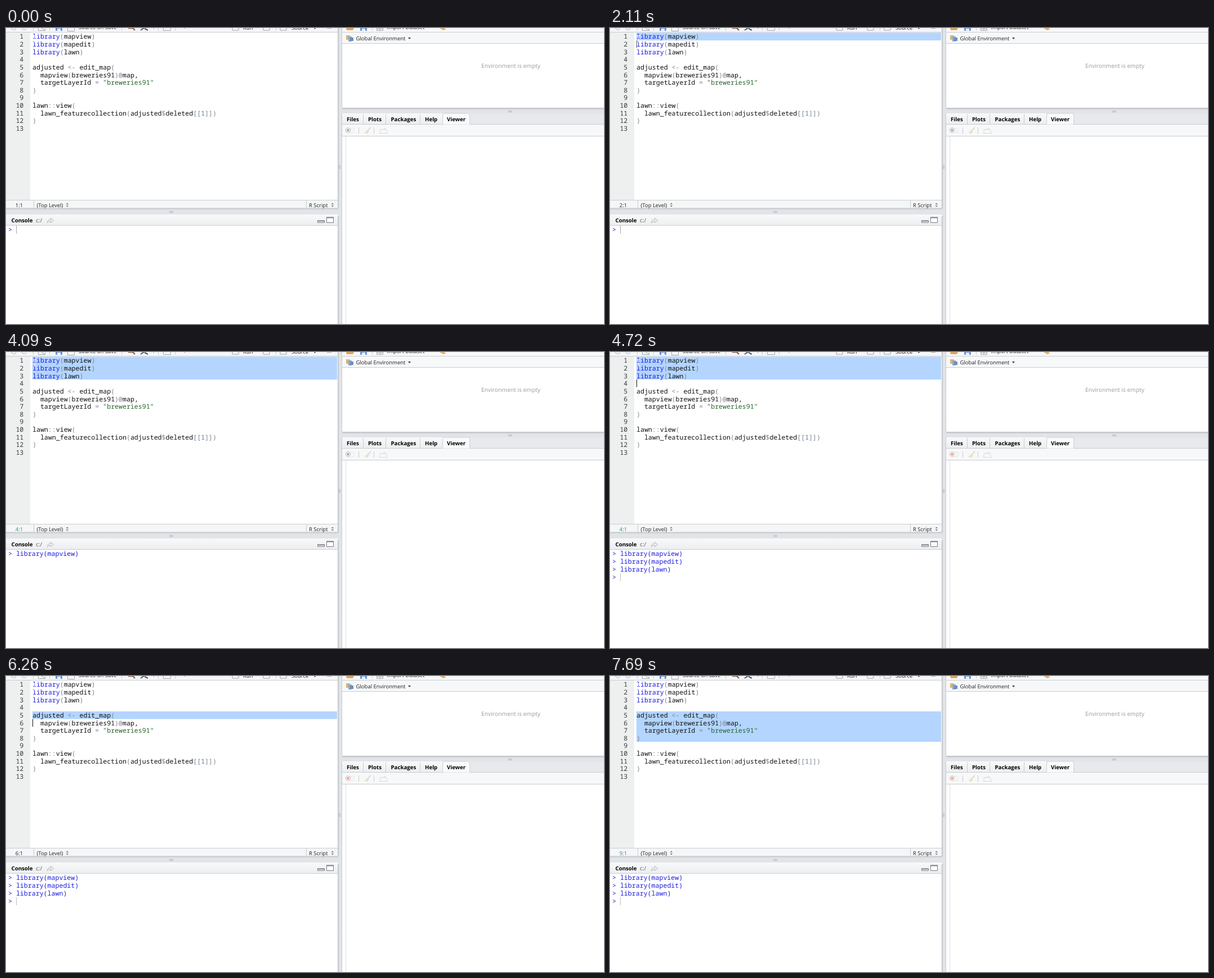
Animation of 1062 by 527 pixels, one loop 8000 ms. Source, as an HTML page:

```html
<!DOCTYPE html>
<html lang="en">
<head>
<meta charset="utf-8">
<title>Editor session</title>
<style>
html, body { margin: 0; width: 100%; height: 100%; overflow: hidden; background: #fff; }
svg { display: block; width: 1062px; height: 527px; }
text { font: 9.5px "Open Sans", "Noto Sans", sans-serif; fill: #222; text-rendering: geometricPrecision; }
.bold text { font-weight: 700; font-size: 9.7px; fill: #000; }
.mono text { font: 11.6px "Noto Sans Mono", monospace; fill: #111; }
.mono .nums { fill: #3a3a3a; text-anchor: end; }
.mono .con { fill: #1c1ce0; }
.k { fill: #1a1ae0; }
.o { fill: #7b8590; }
.s { fill: #23652a; }
.n { fill: #5674b8; }
.line { fill: none; stroke: #c9ccd0; }
.thin { fill: none; stroke: #a5a8ab; }

.sel, .cursor, .pos, .out1, .out2, .out3, .caret, .stop {
  animation: 8s step-end infinite;
}
.sel { animation-name: sel; }
.cursor { animation-name: cursor; }
.pos { animation-name: pos; }
.out1 { animation-name: out1; }
.out2 { animation-name: out2; }
.out3 { animation-name: out3; }
.caret { animation-name: caret; }
.stop { animation-name: stop; }

@keyframes sel {
  0% { y: 8.5px; height: 0; }
  24.875% { y: 8.5px; height: 13.6px; }
  30.875% { y: 8.5px; height: 27.3px; }
  35.625% { y: 8.5px; height: 40.5px; }
  67.75% { y: 63px; height: 0; }
  78.25% { y: 63px; height: 13.6px; }
  82.5% { y: 63px; height: 27.3px; }
  84% { y: 63px; height: 40.9px; }
  89.875%, 100% { y: 63px; height: 54.2px; }
}
@keyframes cursor {
  0% { y: 8.5px; opacity: 0; }
  .875% { y: 8.5px; opacity: 1; }
  8.5% { y: 8.5px; opacity: 0; }
  13.125% { y: 8.5px; opacity: 1; }
  20% { y: 8.5px; opacity: 0; }
  24.875% { y: 22.1px; opacity: 0; }
  26.375% { y: 22.1px; opacity: .7; }
  30.875% { y: 35.8px; opacity: 1; }
  35.625% { y: 49px; opacity: 1; }
  40.25% { y: 49px; opacity: 0; }
  44.875% { y: 49px; opacity: 1; }
  51.125% { y: 49px; opacity: 0; }
  59% { y: 49px; opacity: 1; }
  67.75% { y: 63px; opacity: 1; }
  73.75% { y: 63px; opacity: 0; }
  78.25% { y: 76.7px; opacity: 1; }
  82.5% { y: 90.3px; opacity: 1; }
  84% { y: 103.9px; opacity: 1; }
  89.875% { y: 117.5px; opacity: 1; }
  96.125%, 100% { y: 117.5px; opacity: 0; }
}
@keyframes pos {
  0% { transform: none; }
  24.875% { transform: translateY(-20px); }
  30.875% { transform: translateY(-40px); }
  35.625% { transform: translateY(-60px); }
  67.75% { transform: translateY(-80px); }
  78.25% { transform: translateY(-100px); }
  82.5% { transform: translateY(-120px); }
  84% { transform: translateY(-140px); }
  89.875%, 100% { transform: translateY(-160px); }
}
@keyframes out1 { 0% { opacity: 0; } 51.125%, 100% { opacity: 1; } }
@keyframes out2 { 0% { opacity: 0; } 52.625%, 100% { opacity: 1; } }
@keyframes out3 { 0% { opacity: 0; } 56.25%, 100% { opacity: 1; } }
@keyframes caret {
  0% { y: 352px; opacity: 1; }
  51.125% { y: 352px; opacity: 0; }
  56.25%, 100% { y: 394px; opacity: .75; }
}
@keyframes stop { 0% { stroke: #989898; } 56.25%, 100% { stroke: #d58f8f; } }
</style>
</head>
<body>
<svg viewBox="0 0 1062 527">
  <defs>
    <linearGradient id="bar" x2="0" y2="1">
      <stop stop-color="#f8f9fa"/><stop offset="1" stop-color="#eceef0"/>
    </linearGradient>
    <linearGradient id="under" x2="0" y2="1">
      <stop stop-color="#b9bdc2"/><stop offset="1" stop-color="#e2e4e8"/>
    </linearGradient>
    <linearGradient id="beside">
      <stop stop-color="#b9bdc2"/><stop offset="1" stop-color="#e2e4e8"/>
    </linearGradient>
    <clipPath id="posBox"><rect y="307" width="48" height="13"/></clipPath>
    <path id="spin" d="M0 -1l2.3 -2.6L4.6 -1zM0 1l2.3 2.6L4.6 1z" fill="#777"/>
    <path id="drop" d="M0 0h5l-2.5 3z" fill="#333"/>
    <g id="disk"><path d="M0-7h12V5H0z" fill="#6f93cf"/><path d="M3 1h6v4H3z" fill="#e6edf8"/></g>
    <g id="sheet"><path d="M0-6h11v10H0z" fill="#fafafa" stroke="#9a9da0"/><path d="M7-1h6" stroke="#6a94c8" stroke-width="2"/></g>
    <path id="grip" d="M0 0h7M0 2h7" stroke="#b4b8bd"/>
  </defs>

  <!-- panes -->
  <rect width="1062" height="527" fill="#e2e4e8"/>
  <rect y="320" width="590" height="4" fill="url(#under)"/>
  <rect x="597" y="142" width="465" height="4" fill="url(#under)"/>
  <rect x="589" width="3" height="321" fill="url(#beside)"/>
  <rect x="589" y="335" width="3" height="192" fill="url(#beside)"/>
  <rect width="589" height="320" fill="#fff"/>
  <rect width="589" height="7.5" fill="#f5f6f7"/>
  <rect y="8" width="43" height="299" fill="#eef0f0"/>
  <rect y="307" width="589" height="13.5" fill="#f4f6f7"/>
  <rect y="332" width="589" height="195" fill="#fff"/>
  <path d="M0 332h585q4 0 4 4v15H0z" fill="url(#bar)"/>
  <rect x="597" width="465" height="142" fill="#fff"/>
  <rect x="597" width="465" height="27" fill="#f7f8f9"/>
  <rect x="597" y="152" width="465" height="375" fill="#fff"/>
  <rect x="597" y="152" width="465" height="19" fill="#e7e9ec"/>
  <path d="M597 152h178v19H597z" fill="url(#bar)"/>
  <path d="M775.5 172v-17q0-3 3-3h42q3 0 3 3v17z" fill="#f9fafb" stroke="#cdd0d4"/>
  <rect x="597" y="172" width="465" height="20" fill="#f7f8f9"/>
  <path class="line" d="M0 7.5h589M0 306.5h589M0 351.5h589M49.5 307v13M533.5 307v13M597 7.5h465M597 27.5h465M597 171.5h178M824 171.5h238M597 192.5h465M634.5 153v18M674.5 153v18M735.5 153v18"/>
  <path d="M596.5 0v142M596.5 152v375" stroke="#c6cacf"/>
  <path d="M603.5 193v334" stroke="#dcdee1"/>
  <use href="#grip" x="290" y="326.5"/>
  <use href="#grip" x="892" y="147.5"/>
  <path d="M591.5 244v7M593.5 244v7" stroke="#b4b8bd"/>

  <!-- cut-off toolbars -->
  <path d="M9 0q5 6 9 1M28 0q4 6 8 1" fill="none" stroke="#c9cccf" stroke-width="1.5"/>
  <path class="thin" d="M57.5 0v4.5h12V1M63 0l6 4M109.5 0v5.5h12V0M279.5 0v4.5h13V0M570 .5h8"/>
  <path class="line" d="M48.5 0v5M77.5 0v5M205.5 0v5M270.5 0v5M300.5 0v5M479.5 0v5M650.5 0v5"/>
  <use href="#disk" x="88"/>
  <path d="M217 0h8l4 4" fill="none" stroke="#87604b" stroke-width="2.4"/>
  <path d="M239 4l6-4M246 1l6 3" stroke="#4d5868" stroke-width="2"/>
  <use href="#drop" x="260" y="-2"/>
  <use href="#drop" x="315" y="-2"/>
  <use href="#sheet" x="402"/>
  <use href="#sheet" x="457"/>
  <use href="#sheet" x="487"/>
  <use href="#drop" x="546" y="-1"/>
  <path d="M604 0h14l-2 4h-11z" fill="#d9a867"/>
  <use href="#disk" x="629"/>
  <path class="thin" d="M658.5 0v4.5h11V0M664 0v4M659 1.5h10"/>
  <path d="M770 0l6 4 5-1-2-3z" fill="#ddb477"/>
  <text x="129" y="2.2">Source on Save</text>
  <text x="421" y="2.6">Run</text>
  <text x="507" y="2.6">Source</text>
  <text x="676.5" y="2.2">Import Dataset</text>

  <!-- environment and viewer -->
  <path d="M604 13h7v8h-7z" fill="#dfb36d"/>
  <path d="M608 15h6v9h-6z" fill="#86a9d6"/>
  <path d="M611 17h6v6h-6z" fill="#6c8fbe"/>
  <text x="621.5" y="21.6">Global Environment</text>
  <use href="#drop" x="714" y="17"/>
  <text x="844" y="71" style="font-size:10.3px;fill:#9a9a9a">Environment is empty</text>
  <g class="bold">
    <text x="605" y="165.5">Files</text>
    <text x="643" y="165.5">Plots</text>
    <text x="683.5" y="165.5">Packages</text>
    <text x="744" y="165.5">Help</text>
    <text x="783" y="165.5">Viewer</text>
    <text x="9.5" y="346">Console</text>
  </g>
  <path class="line" d="M626.5 177v11M653.5 177v11"/>
  <path d="M609 178.5h9v8h-9z" fill="#f7f7f7" stroke="#e8e9ea"/>
  <g class="stop" fill="#f4f2f2">
    <circle cx="607.5" cy="182" r="4.2" stroke-opacity=".6"/>
    <path d="M605.8 180.3l3.4 3.4m0-3.4l-3.4 3.4" stroke-width="1.5"/>
  </g>
  <path d="M648 177l-5 5" stroke="#d6cbc3" stroke-width="1.5"/>
  <path d="M642 181l3 3-3 4.5-6-2z" fill="#eee0c8"/>
  <path d="M664.5 180.5h10l3 7h-14zM667 183q3-5 8-4" fill="none" stroke="#d9dbdd"/>

  <!-- editor -->
  <rect class="sel" x="47" y="8.5" width="541" height="0" fill="#b3d5ff"/>
  <g class="mono">
    <text class="nums" id="nums"></text>
    <text x="47" y="19.4"><tspan class="k">library</tspan><tspan class="o">(</tspan>mapview<tspan class="o">)</tspan></text>
    <text x="47" y="33"><tspan class="k">library</tspan><tspan class="o">(</tspan>mapedit<tspan class="o">)</tspan></text>
    <text x="47" y="46.6"><tspan class="k">library</tspan><tspan class="o">(</tspan>lawn<tspan class="o">)</tspan></text>
    <text x="47" y="73.9">adjusted <tspan class="o">&lt;-</tspan> edit_map<tspan class="o">(</tspan></text>
    <text x="60.9" y="87.5">mapview<tspan class="o">(</tspan>breweries91<tspan class="o">)@</tspan>map,</text>
    <text x="60.9" y="101.2">targetLayerId <tspan class="o">=</tspan> <tspan class="s">"breweries91"</tspan></text>
    <text x="47" y="114.8"><tspan class="o">)</tspan></text>
    <text x="47" y="142.1">lawn<tspan class="o">::</tspan>view<tspan class="o">(</tspan></text>
    <text x="60.9" y="155.7">lawn_featurecollection<tspan class="o">(</tspan>adjusted<tspan class="o">$</tspan>deleted<tspan class="o">[[</tspan><tspan class="n">1</tspan><tspan class="o">]])</tspan></text>
    <text x="47" y="169.3"><tspan class="o">)</tspan></text>
  </g>
  <path d="M49 13.5h4M51 13.5v11.5M49 25h4" fill="none" stroke="#fff" stroke-opacity=".85"/>
  <rect class="cursor" x="47" width="1" height="13.6" fill="#111"/>

  <!-- status bar -->
  <g clip-path="url(#posBox)"><g class="pos"><text id="pos" text-anchor="middle"></text></g></g>
  <text x="54.5" y="318.5">(Top Level)</text>
  <use href="#spin" x="106.5" y="315"/>
  <text x="538" y="318.5">R Script</text>
  <use href="#spin" x="577.5" y="315"/>

  <!-- console -->
  <text x="53" y="346" style="font-size:10px;fill:#555">c:/</text>
  <path d="M73.5 347q0-6 6-6v-2.5l5 4-5 4V344q-4 0-6 3z" fill="#f0f1f2" stroke="#b4b7ba"/>
  <path d="M553.5 343.5h12v3h-12zM569.5 337.5h12v9h-12z" fill="#fff" stroke="#777b80"/>
  <path d="M553 343.5h13M569 337.5h13" stroke="#777b80" stroke-width="2"/>
  <g class="mono">
    <text class="con" x="4" y="363.2">&gt;</text>
    <text class="con out1" x="17.9" y="363.2">library(mapview)</text>
    <text class="con out2" x="4" y="377.1">&gt; library(mapedit)</text>
    <g class="out3">
      <text class="con" x="4" y="391">&gt; library(lawn)</text>
      <text class="con" x="4" y="404.9">&gt;</text>
    </g>
  </g>
  <rect class="caret" x="18" y="352" width="1" height="14" fill="#a3a3a3"/>
</svg>
<script>
const column = (id, count, x, y, step, label) => {
  const parent = document.getElementById(id);
  for (let i = 0; i < count; i++) {
    const row = document.createElementNS("http://www.w3.org/2000/svg", "tspan");
    row.setAttribute("x", x);
    row.setAttribute("y", y + i * step);
    row.textContent = label(i + 1);
    parent.append(row);
  }
  return parent.children;
};
column("nums", 13, 31.3, 19.4, 13.63, n => n);
const places = column("pos", 9, 23.5, 318.5, 20, n => n + ":1");
for (const n of [4, 9]) places[n - 1].style.fill = "#2f9467";
</script>
</body>
</html>
```
